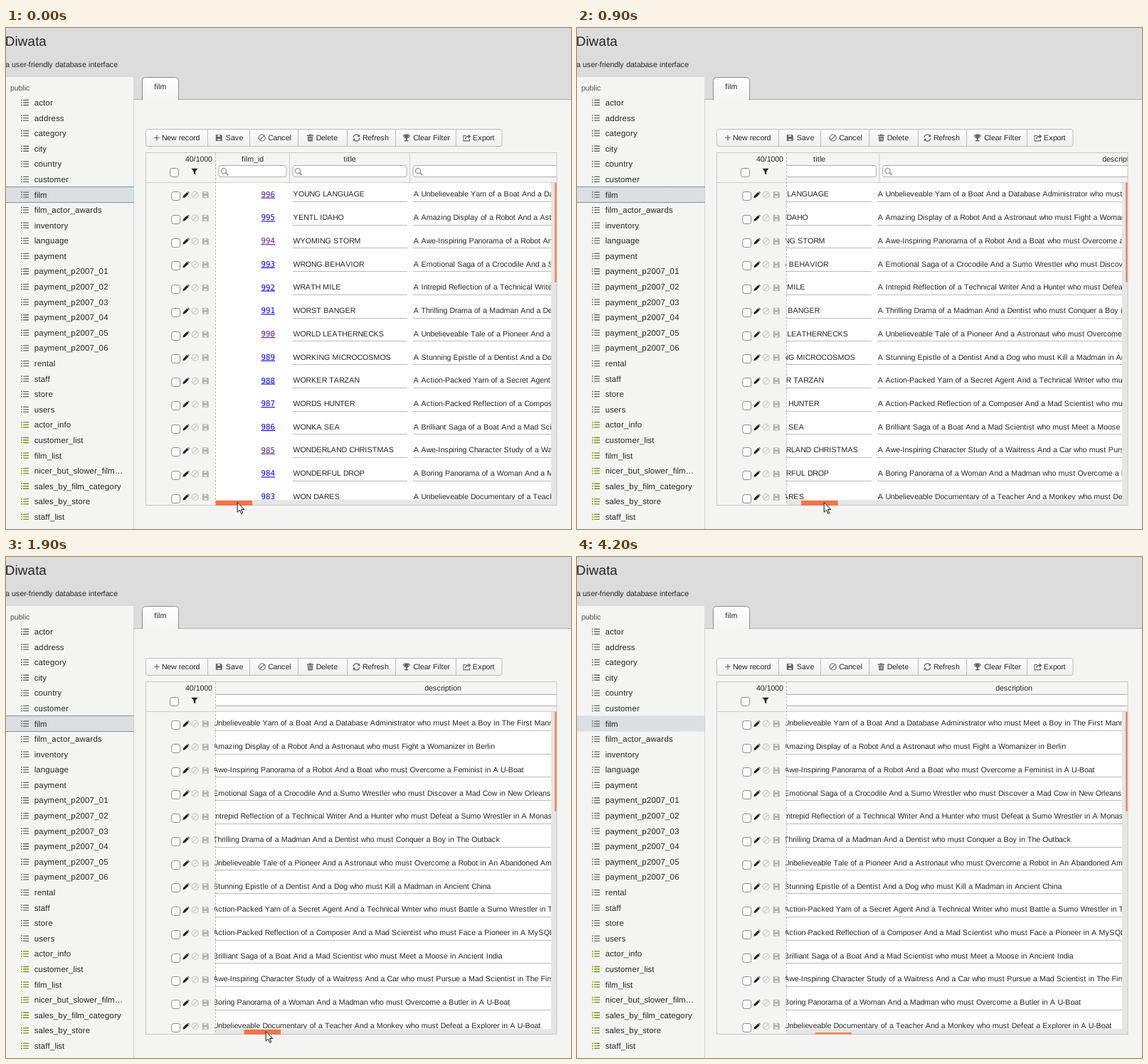
Animation of 794 by 705 pixels, one loop 4400 ms. Source, as an HTML page:

```html
<!DOCTYPE html>
<html lang="en">
<head>
<meta charset="utf-8">
<title>Database table scrolling</title>
<style>
html, body { margin: 0; width: 100%; height: 100%; overflow: hidden; background: #f4f4f3; }
svg { display: block; width: 794px; height: 705px; }
text { font-family: "Liberation Sans", Arial, sans-serif; fill: #262626; text-rendering: geometricPrecision; white-space: pre; }
.mono { font-family: "DejaVu Sans Mono", monospace; font-size: 10.83px; text-decoration: underline; }
</style>
</head>
<body>
<svg id="stage" viewBox="0 0 794 705">
  <defs>
    <linearGradient id="tabFill" x2="0" y2="1"><stop stop-color="#fff"/><stop offset="1" stop-color="#f4f4f3"/></linearGradient>
    <linearGradient id="btnFill" x2="0" y2="1"><stop stop-color="#fdfdfd"/><stop offset="1" stop-color="#efefef"/></linearGradient>
    <clipPath id="headClip"><rect x="295" y="176" width="479" height="41"/></clipPath>
    <clipPath id="bodyClip"><rect x="293" y="218" width="473" height="446"/></clipPath>
    <clipPath id="leftClip"><rect x="197" y="218" width="98" height="453"/></clipPath>
  </defs>
  <g id="page"></g>
  <g id="grid"></g>
  <g clip-path="url(#headClip)"><g id="head"></g></g>
  <g clip-path="url(#bodyClip)"><g id="body"></g></g>
  <g id="frame"></g>
  <rect id="bar" width="51.5"/>
  <path id="cursor" d="M.5 .5V14.2L3.7 11.3 6 16.3 8 15.4 5.8 10.5H10Z" fill="#fff" stroke="#111"/>
</svg>
<script>
const LOOP = 4400, STEP = 100;
const ZOOM = 9 / 11; // the page is shown reduced; font sizes below are before reduction
const el = id => document.getElementById(id);
const add = (id, markup) => { el(id).innerHTML += markup; };

const rect = (x, y, w, h, fill, more = "") =>
  `<rect x="${x}" y="${y}" width="${w}" height="${h}" fill="${fill}" ${more}/>`;
const line = (x1, y1, x2, y2, color, more = "") =>
  `<path d="M${x1} ${y1}L${x2} ${y2}" stroke="${color}" ${more}/>`;
const at = (x, y, markup, color) =>
  `<g transform="translate(${x} ${y})" color="${color}">${markup}</g>`;
const stroked = (d, w = 1.2) => `<path d="${d}" fill="none" stroke="currentColor" stroke-width="${w}"/>`;
const filled = d => `<path d="${d}" fill="currentColor" fill-rule="evenodd"/>`;

// Glyphs advance by whole pixels before the reduction, as hinted screen text does
const pen = document.createElement("canvas").getContext("2d");
function text(x, y, str, { px = 13, centred = false, color = "#262626" } = {}) {
  pen.font = `${px}px "Liberation Sans", Arial, sans-serif`;
  const xs = [];
  let width = 0;
  for (const ch of str) {
    xs.push(width);
    width += Math.round(pen.measureText(ch).width) * ZOOM;
  }
  const left = centred ? x - width / 2 : x;
  return `<text x="${xs.map(v => (left + v).toFixed(2)).join(" ")}" y="${y}" ` +
    `style="font-size:${px * ZOOM}px;fill:${color}">${str}</text>`;
}

// Icons are drawn around their own centre
const icons = {
  plus: stroked("M-3.7 0H3.7M0-3.7V3.7", 1.2),
  save: filled("M-4.5-4.5H3L4.5-3V4.5H-4.5ZM-2-3.8V-1.6H1.6V-3.8ZM-2 1.4V3.6H2V1.4Z"),
  ban: stroked("M-4.5 0A4.5 4.5 0 1 1 4.5 0A4.5 4.5 0 1 1-4.5 0M-3.1 3.1L3.1-3.1"),
  trash: filled("M-4.6-4H-1.6V-5H1.6V-4H4.6V-2.6H-4.6ZM-3.7-1.8H3.7L3.2 5H-3.2ZM-2-.6V3.6H-1.3V-.6ZM-.3-.6V3.6H.3V-.6ZM1.3-.6V3.6H2V-.6Z"),
  refresh: stroked("M-4.4-.6A4.4 4.4 0 0 1 3.6-2.6M4.4 .6A4.4 4.4 0 0 1-3.6 2.6", 1.3) +
    filled("M4.8-5V-1.2H1ZM-4.8 5V1.2H-1Z"),
  clear: filled("M-3-5H3V-4H5V-2.5Q4.4 0 1.8 .4L.8 1.4V3.4H2.6V5H-2.6V3.4H-.8V1.4L-1.8 .4Q-4.4 0-5-2.5V-4H-3ZM-4.2-3.1Q-3.6-1.4-2.5-.9L-3-3.1ZM4.2-3.1H3L2.5-.9Q3.6-1.4 4.2-3.1Z"),
  share: stroked("M-1-3H-5V4.4H3.4V1.6", 1.1) + stroked("M-2.4 1.8Q-2-2 2-2", 1.3) + filled("M1.6-5L5.6-2 1.6 1Z"),
  funnel: filled("M-4.5-4.2H4.5L1.2 0V4.5L-1.2 2.8V0Z"),
  pencil: filled("M-4.6 4.4L-3.8 1.4 1.5-3.8 3.8-1.5-1.5 3.7ZM2.2-4.3L3-4.8 4.8-3 4.3-2.2Z"),
  search: `<circle cx="-1" cy="-1" r="3.6" fill="none" stroke="currentColor" stroke-width="1.4"/>` + stroked("M1.7 1.7L5 5", 1.8),
  list: stroked("M-2.4-3.5H5.5M-2.4 0H5.5M-2.4 3.5H5.5", 1.3) + stroked("M-5.5-3.5H-3.8M-5.5 0H-3.8M-5.5 3.5H-3.8", 1.5)
};
const checkbox = (x, y) => rect(x, y, 12, 12, "#fcfcfc", 'rx="3" stroke="#8a8a8a"');

function drawPage() {
  add("page",
    rect(0, 0, 794, 705, "#f4f4f3") + rect(0, 0, 794, 101, "#dcdcdc") +
    rect(0, 69, 179, 636, "#f4f4f3") + line(179.5, 101, 179.5, 705, "#d2d2d2") +
    line(179, 100.5, 794, 100.5, "#b0b0b0") +
    `<path d="M191.5 101.5V74.5Q191.5 69.5 196.5 69.5H237.5Q242.5 69.5 242.5 74.5V101.5" fill="url(#tabFill)" stroke="#8c8c8c"/>` +
    text(-1.3, 24.7, "Diwata", { px: 23 }) + text(-1, 54.8, "a user-friendly database interface") +
    text(6, 88.2, "public", { color: "#555" }) + text(208.3, 86.2, "film"));

  const payments = [1, 2, 3, 4, 5, 6].map(n => "payment_p2007_0" + n);
  const tables = ["actor", "address", "category", "city", "country", "customer", "film", "film_actor_awards",
    "inventory", "language", "payment", ...payments, "rental", "staff", "store", "users"];
  const views = ["actor_info", "customer_list", "film_list", "nicer_but_slower_film…",
    "sales_by_film_category", "sales_by_store", "staff_list"];
  add("page", rect(0, 223.5, 179, 22, "#dbdfe1") +
    `<path id="focus" d="M0 223.5H179M0 245.5H179" stroke="#333" stroke-dasharray="1 1"/>`);
  [...tables, ...views].forEach((name, i) => {
    const y = 105 + i * 21.59;
    add("page", at(26.5, y, icons.list, i < tables.length ? "#666" : "#6f9410") + text(39.8, y + 4, name, { px: 14 }));
  });

  add("page", rect(196.5, 142.5, 500.5, 24, "url(#btnFill)", 'rx="3" stroke="#bbb"'));
  const buttons = [
    ["plus", 212, 219, "New record"], ["save", 299.3, 308.7, "Save", 283.5], ["ban", 359.8, 368.2, "Cancel", 342.5],
    ["trash", 427.5, 435.7, "Delete", 410.5], ["refresh", 492.5, 500.9, "Refresh", 479.5],
    ["clear", 562.8, 572.2, "Clear Filter", 547.5], ["share", 648, 655.8, "Export", 632.5]];
  for (const [icon, x, tx, label, divider] of buttons)
    add("page", (divider ? line(divider, 143, divider, 166, "#bbb") : "") +
      at(x, 154.5, icons[icon], "#666") + text(tx, 158, label));
}

const titles = ["YOUNG LANGUAGE", "YENTL IDAHO", "WYOMING STORM", "WRONG BEHAVIOR", "WRATH MILE", "WORST BANGER",
  "WORLD LEATHERNECKS", "WORKING MICROCOSMOS", "WORKER TARZAN", "WORDS HUNTER", "WONKA SEA",
  "WONDERLAND CHRISTMAS", "WONDERFUL DROP", "WON DARES"];
const plots = [
  "Unbelieveable Yarn of a Boat And a Database Administrator who must Meet a Boy in The First Manned Space Station",
  "Amazing Display of a Robot And a Astronaut who must Fight a Womanizer in Berlin",
  "Awe-Inspiring Panorama of a Robot And a Boat who must Overcome a Feminist in A U-Boat",
  "Emotional Saga of a Crocodile And a Sumo Wrestler who must Discover a Mad Cow in New Orleans",
  "Intrepid Reflection of a Technical Writer And a Hunter who must Defeat a Sumo Wrestler in A Monastery",
  "Thrilling Drama of a Madman And a Dentist who must Conquer a Boy in The Outback",
  "Unbelieveable Tale of a Pioneer And a Astronaut who must Overcome a Robot in An Abandoned Amusement Park",
  "Stunning Epistle of a Dentist And a Dog who must Kill a Madman in Ancient China",
  "Action-Packed Yarn of a Secret Agent And a Technical Writer who must Battle a Sumo Wrestler in The Outback",
  "Action-Packed Reflection of a Composer And a Mad Scientist who must Face a Pioneer in A MySQL Convention",
  "Brilliant Saga of a Boat And a Mad Scientist who must Meet a Moose in Ancient India",
  "Awe-Inspiring Character Study of a Waitress And a Car who must Pursue a Mad Scientist in The First Manned Space Station",
  "Boring Panorama of a Woman And a Madman who must Overcome a Butler in A U-Boat",
  "Unbelieveable Documentary of a Teacher And a Monkey who must Defeat a Explorer in A U-Boat"];
const visited = [996, 994, 990, 985];

function drawGrid() {
  add("grid", rect(295, 218, 471, 446, "#fff") +
    text(252, 188, "40/1000") + checkbox(230.5, 197.5) + at(265, 202, icons.funnel, "#222"));

  const columns = [["film_id", 294.5, 398.5], ["title", 398.5, 567.5], ["description", 567.5, 1245.5]];
  for (const [name, x1, x2] of columns)
    add("head", text((x1 + x2) / 2, 188, name, { centred: true }) +
      rect(x1 + 4.5, 193.5, x2 - x1 - 9, 16, "#fff", 'rx="3" stroke="#aaa"') +
      at(x1 + 12.5, 202, icons.search, "#999") + line(x2, 176, x2, 217, "#ccc"));

  let left = "";
  titles.forEach((title, i) => {
    const y = 233.7 + i * 32.73, base = y + 3.7, rule = Math.round(y + 10.3) + .5, id = 996 - i;
    left += checkbox(232.7, Math.round(y - 3.5) + .5) + at(253, y + 1, icons.pencil, "#222") +
      at(265.7, y + 1, icons.ban, "#c8c8c8") + at(280.3, y + 1, icons.save, "#b4b4b4");
    add("body",
      `<text class="mono" x="378" y="${base + .3}" text-anchor="end" style="fill:${visited.includes(id) ? "#551a8b" : "#0000ee"}">${id}</text>` +
      text(403.6, base, title) + text(572.8, base, "A " + plots[i]) +
      line(403, rule, 564, rule, "#bbb") + line(572, rule, 1241, rule, "#bbb"));
  });
  add("frame", `<g clip-path="url(#leftClip)">${left}</g>` +
    rect(766, 218, 8, 454, "#e6e6e6") + rect(295, 664, 471, 8, "#e6e6e6") +
    rect(771, 218, 3, 140, "#f28a66") +
    line(196, 217.5, 774, 217.5, "#ccc") +
    line(294.5, 176, 294.5, 672, "#bbb", 'stroke-dasharray="3 2"') +
    rect(196.5, 175.5, 577.5, 496, "none", 'stroke="#c6c6c6"'));
}

// Drag in pixels per step: the pointer leads, the rows follow, the header trails by one step
const pointer = [0, 1, 4, 8, 12, 15.5, 17, 19.5, 22, 25, 28.5, 32, 36.5, 39, 40];
const thumb = [0, 1, 4, 8, 12, 12, 15, 19, 20, 23, 27, 31, 35, 38, 39];
const LAST = thumb.length - 1, RATIO = 7.5;

function cursorAt(t, step) {
  if (t < 2300) return [324.7 + pointer[step], 667];
  if (t < 2800) {
    const u = Math.floor((t - 2300) / STEP) / 4;
    return [358 + 157 * u ** 1.4, 640 - 565 * u];
  }
  return t >= 3400 && t < 3500 ? [388.5, -13.5] : null;
}

function draw(now) {
  const t = now % LOOP;
  const step = Math.min(LAST, Math.max(0, Math.floor(t / STEP) - 1));
  const scroll = thumb[step] * RATIO;
  const headScroll = (step === LAST ? thumb[LAST] : thumb[Math.max(0, step - 1)]) * RATIO;
  const shift = (id, x, y = 0) => el(id).setAttribute("transform", `translate(${x} ${y})`);
  shift("body", -scroll);
  shift("head", -headScroll);

  const held = t < 2100, bar = el("bar");
  bar.setAttribute("x", 294.7 + scroll / 7.33);
  bar.setAttribute("y", held ? 665 : 669);
  bar.setAttribute("height", held ? 7 : 3);
  bar.setAttribute("fill", held ? "#f1744a" : "#f28a66");

  const pos = cursorAt(t, step);
  el("cursor").style.display = pos ? "" : "none";
  if (pos) shift("cursor", ...pos);
  el("focus").style.display = t < 4200 ? "" : "none";
}

drawPage();
drawGrid();
const start = performance.now();
function tick() {
  draw(performance.now() - start);
  requestAnimationFrame(tick);
}
tick();
</script>
</body>
</html>
```
